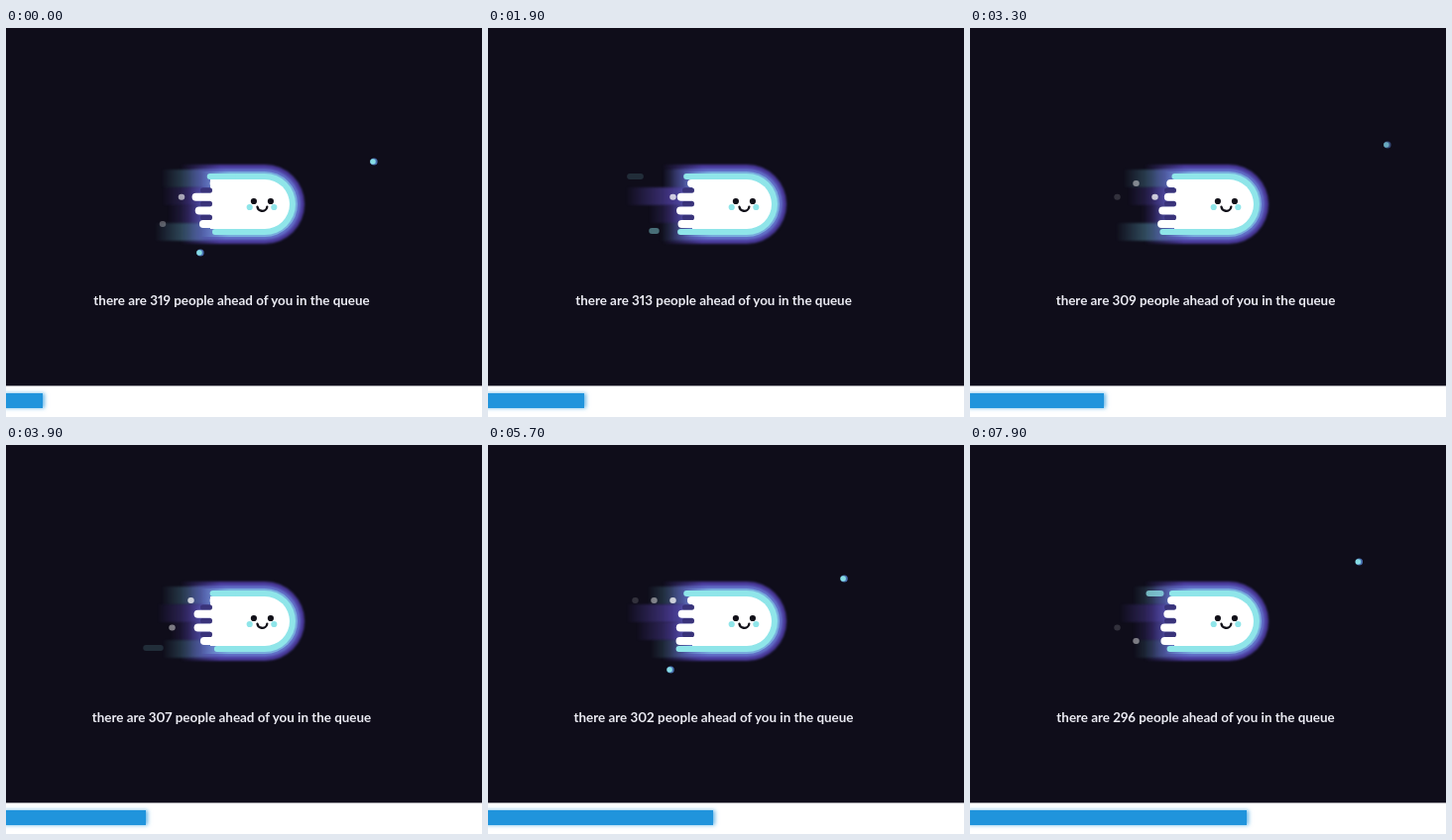
Animation, 480 px wide and 393 px high, one loop 8000 ms. Source, as an HTML page with a canvas:

```html
<!DOCTYPE html>
<html lang="en">
<head>
<meta charset="utf-8">
<title>Queue</title>
<style>
html, body { margin: 0; width: 100%; height: 100%; overflow: hidden; background: #fff; }
canvas { position: absolute; left: 0; top: 0; }
#msg {
  position: absolute; left: 0; top: 265px; width: 455px; text-align: center;
  font: bold 13.4px/20px Lato, "Open Sans", sans-serif; color: #ebebf3; white-space: nowrap;
  font-variant-numeric: proportional-nums;
}
#bar {
  position: absolute; left: -4px; top: 368.5px; height: 15.5px; padding-left: 4px;
  background: #2094dc; box-shadow: 2px 0 4px #2094dcaa; filter: blur(.5px);
}
</style>
</head>
<body>
<canvas id="c" width="480" height="393"></canvas>
<div id="msg">there are <span id="n">319</span> people ahead of you in the queue</div>
<div id="bar"></div>
<script>
const $ = id => document.getElementById(id);
const ctx = $('c').getContext('2d');
const CX = 261, CY = 178, ROW = 13.7, LOOP = 8000;
const WHITE = '#fff', CYAN = '#8fe5e9', INK = '#111018';

// Loading progress: [seconds, pixels]
const progress = [[0, 37], [1, 62], [2.7, 129], [3.9, 141], [5.7, 227], [6.9, 238], [8, 283]];

const rand = n => {
  const v = Math.sin(n * 127.1 + 3.7) * 43758.5453;
  return v - Math.floor(v);
};

// Irregular flutter between -1 and 1, different for every seed
const flutter = (seed, t) =>
  (Math.sin(t * (5 + 2 * rand(seed)) + seed * 2.4) + Math.sin(t * 8.3 + seed * 4.1)) / 2;

function barWidth(t) {
  const i = progress.findIndex(([at]) => at > t);
  const [t0, w0] = progress[i - 1], [t1, w1] = progress[i];
  return w0 + (w1 - w0) * (t - t0) / (t1 - t0);
}

function disc(x, y, r, color) {
  ctx.fillStyle = color;
  ctx.beginPath();
  ctx.arc(x, y, r, 0, 7);
  ctx.fill();
}

function pill(x, y, w, h, color) {
  ctx.fillStyle = color;
  ctx.beginPath();
  ctx.roundRect(x, y - h / 2, w, h, h / 2);
  ctx.fill();
}

function fade(x0, x1, rgb, alpha = 1) {
  const g = ctx.createLinearGradient(x0, 0, x1, 0);
  g.addColorStop(0, `rgba(${rgb},0)`);
  g.addColorStop(1, `rgba(${rgb},${alpha})`);
  return g;
}

function head(x, r, fill) {
  ctx.fillStyle = fill;
  ctx.beginPath();
  ctx.moveTo(x, CY - r);
  ctx.arc(CX, CY, r, -Math.PI / 2, Math.PI / 2);
  ctx.lineTo(x, CY + r);
  ctx.fill();
}

// Four wide bands, teal outside and violet inside
function drawTail(t) {
  for (let i = 0; i < 4; i++) {
    const x = 158 + 20 * flutter(i + 1, t);
    ctx.fillStyle = fade(x, x + 45, i % 3 ? '80,64,158' : '82,138,160', .75);
    ctx.fillRect(x, 143 + 18 * i, 222 - x, 18);
  }
}

function drawBody(t) {
  ctx.filter = 'blur(1.2px)';
  drawTail(t);
  head(176, 40, fade(176, 216, '74,58,156'));
  head(184, 36, fade(184, 222, '98,112,200'));
  ctx.filter = 'blur(.7px)';
  head(196, 33, fade(196, 226, '120,172,220'));
  head(216, 31, CYAN);
  for (const side of [-1, 1]) {
    const x = 200 + 12 * flutter(side + 7, t);
    pill(x, CY + 28 * side, 232 - x, 6, CYAN);
  }
  head(206, 25, WHITE);
  for (let i = 0; i < 3; i++) pill(196, 164 + ROW * i, 12, 5.7, '#39337a');
  for (let i = 0; i < 4; i++) {
    const x = (i ? 191 : 201) + 5 * flutter(i + 11, t);
    pill(x, 157 + ROW * i, 232 - x, 8, WHITE);
  }
  ctx.filter = 'none';
}

// Dots and dashes torn off the strands
function drawDrops(t) {
  const gap = .2, life = .6;
  for (let k = Math.ceil((t - life) / gap); k <= t / gap; k++) {
    const age = t - k * gap;
    const row = Math.floor(rand(k + 40) * 6);
    const edge = row % 5 === 0;
    const y = edge ? 150 + 11 * row : 157 + ROW * (row - 1);
    const w = edge ? 10 + 20 * rand(k) : 6.5;
    ctx.globalAlpha = .9 * (1 - age / life);
    pill(196 - w / 2 - age * 95, y, w, 6, edge ? CYAN : WHITE);
  }
  ctx.globalAlpha = 1;
}

function drawStars(t) {
  const gap = 1.135, life = .45;
  for (let k = 0; k < 8; k++) {
    const age = t - k * gap + .17;
    if (age < 0 || age > life) continue;
    const lanes = k % 5 ? [118] : [135, 227];
    ctx.globalAlpha = Math.min(1, age * 10, (life - age) * 8);
    lanes.forEach((y, i) => {
      const x = 451 - age * 475 - i * 175;
      disc(x + .8, y, 3.6, '#496fb0');
      disc(x - .3, y, 2.8, '#86dce4');
    });
  }
  ctx.globalAlpha = 1;
}

function drawFace() {
  for (const side of [-1, 1]) {
    disc(258 + 12.3 * side, 181, 3.1, CYAN);
    disc(258.4 + 8.5 * side, 175, 3.1, INK);
  }
  ctx.strokeStyle = INK;
  ctx.lineWidth = 2.3;
  ctx.lineCap = 'round';
  ctx.beginPath();
  ctx.arc(258.4, 179.8, 5, .15, Math.PI - .15);
  ctx.stroke();
}

function draw(t) {
  ctx.clearRect(0, 0, 480, 393);
  ctx.fillStyle = '#0f0d1a';
  ctx.fillRect(0, 0, 480, 361.5);
  drawBody(t);
  drawDrops(t);
  drawStars(t);
  drawFace();
  $('n').textContent = 319 - Math.floor(t * 2.92 + .7);
  $('bar').style.width = barWidth(t) + 'px';
}

const start = performance.now();
function frame(now) {
  const ms = Math.max(0, now - start) % LOOP;
  draw(Math.floor(ms / 100) / 10);
  requestAnimationFrame(frame);
}
frame(start);
</script>
</body>
</html>
```
